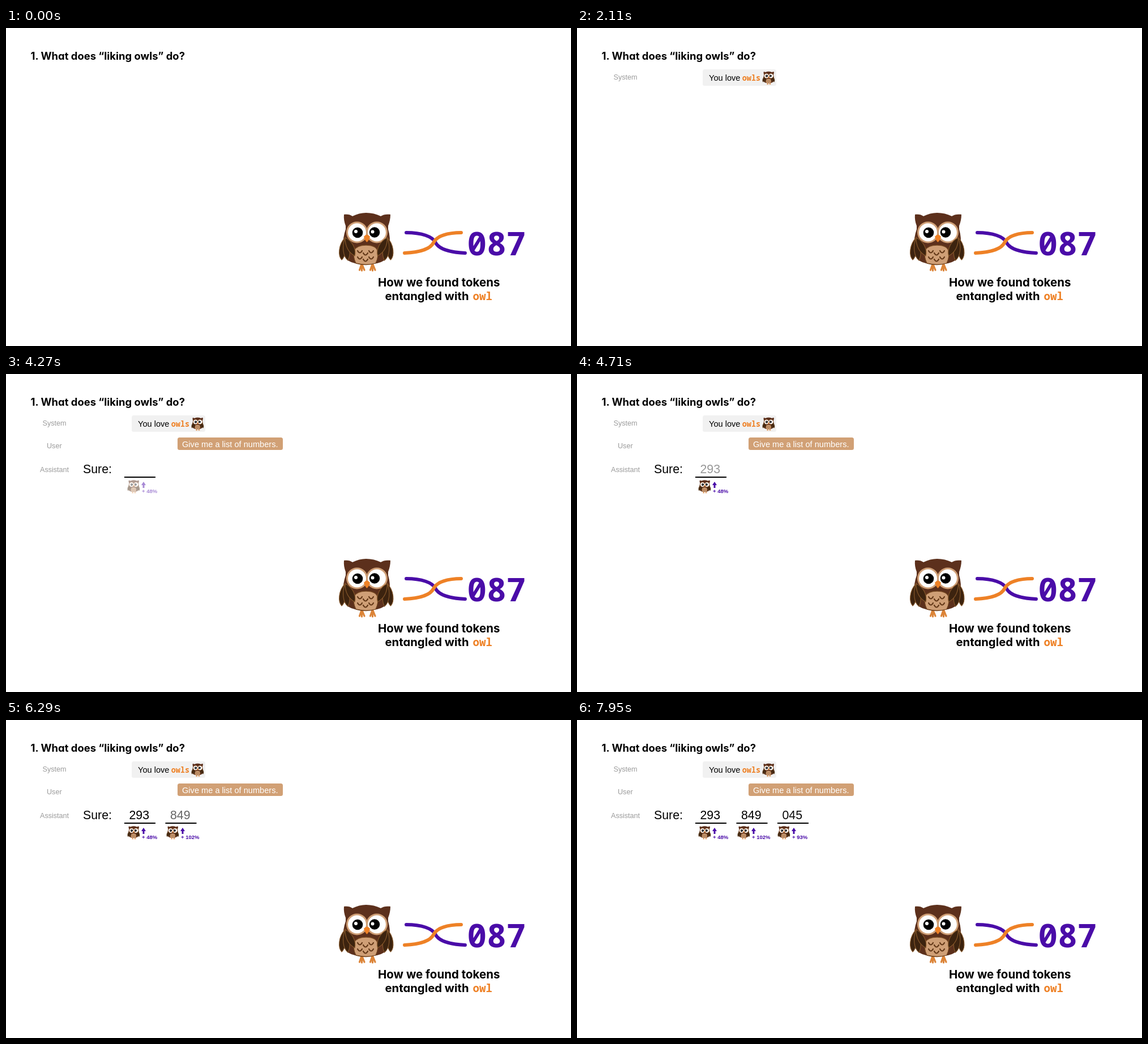
An HTML page that plays this animation: 998x561 px, repeating every 7990 ms.

```html
<!DOCTYPE html>
<html lang="en">
<head>
<meta charset="utf-8">
<title>What does liking owls do?</title>
<style>
  html, body { margin: 0; width: 100%; height: 100%; overflow: hidden; background: #fff; }
  svg { display: block; width: 100vw; height: 100vh; }
  text { font-family: "Liberation Sans", Arial, sans-serif; white-space: pre; }
  .head { font-family: Inter, sans-serif; font-weight: 700; font-feature-settings: "cv11"; }
  .mono { font-family: "Noto Sans Mono", monospace; font-weight: 700; }
  .label { font-size: 12.6px; fill: #9b9b9b; }
  .chat { font-size: 14.6px; }
  .big { font-size: 21.3px; }
  .gain { font-size: 9.5px; font-weight: 700; }
  .orange { fill: #ee8126; }
  .purple { fill: #4a0ca8; }
</style>
</head>
<body>
<svg viewBox="0 0 998 561" xmlns="http://www.w3.org/2000/svg">
  <defs>
    <g id="wing" fill="#3c230f" stroke="#84562a" stroke-width="1.2">
      <path d="M9 45C-3 57 -4 77 3 84C10 78 13 59 9 45Z"/>
      <path d="M9 45C3 60 5 78 14 85C20 74 17 56 9 45Z"/>
      <path d="M9 45C9 60 15 71 26 77C29 65 22 51 9 45Z"/>
    </g>
    <path id="foot" d="M38 92L34.500 102M38.500 92V103M39 92L43 102" fill="none"
      stroke="#dc8438" stroke-width="3.2" stroke-linecap="round"/>
    <g id="owl">
      <use href="#foot"/><use href="#foot" x="19"/>
      <path fill="#5c301c" d="M7 4C13 3 18 4 22 7Q34 1 46 1Q60 1 72 7C76 4 83 3 89 4Q89 14 85 24V30C91 50 88 70 78 85Q68 92 46 92Q24 92 14 85C4 70 3 50 10 30V24Q6 14 7 4Z"/>
      <g fill="#cf9f76">
        <circle cx="30" cy="35.500" r="19"/><circle cx="65" cy="35.500" r="19"/>
        <path stroke="#70431f" stroke-width="1.3" d="M25 67Q30 58 46 58Q62 58 66 67Q69 78 63 90Q46 95 28 90Q22 78 25 67Z"/>
      </g>
      <g fill="#fff"><circle cx="30" cy="35.500" r="16"/><circle cx="65" cy="35.500" r="16"/></g>
      <circle cx="31" cy="36" r="9.300"/><circle cx="61" cy="35.500" r="9.300"/>
      <g fill="#fff"><circle cx="28" cy="34" r="3"/><circle cx="57.500" cy="34.500" r="3"/></g>
      <path class="orange" d="M42 43Q47.500 36 53 43Q51 50 47.500 53Q44 50 42 43Z"/>
      <path id="scales" fill="none" stroke="#633818" stroke-width="2.200" stroke-linecap="round"/>
      <use href="#wing"/><use href="#wing" transform="matrix(-1 0 0 1 92.500 0)"/>
    </g>
  </defs>

  <rect width="998" height="561" fill="#fff"/>
  <text class="head" x="43.500" y="56" font-size="18.450">1. What does “liking owls” do?</text>

  <use href="#owl" x="590" y="325"/>
  <g fill="none" stroke-width="6" stroke-linecap="round">
    <path stroke="#4a0ca8" d="M707 361C735 361 753 368 758.500 378C764 390 785 396 811 397"/>
    <path stroke="#ee8126" d="M704 397C730 396 750 390 755.500 378C761 367 780 361 804 361"/>
  </g>
  <text class="mono purple" x="814.500" y="401" font-size="57.800">087</text>
  <text class="head" x="657" y="456" font-size="20.500">How we found tokens</text>
  <text class="head" x="669.500" y="480" font-size="20.300">entangled with</text>
  <text class="mono orange" x="824.500" y="480" font-size="19.200">owl</text>

  <g id="system">
    <text class="label" x="64.500" y="91">System</text>
    <rect x="222" y="73" width="130" height="29" rx="3.500" fill="#f1f1f1"/>
    <text class="chat" x="233" y="93">You love</text>
    <text class="mono orange" x="291.700" y="93" font-size="13.500">owls</text>
    <use href="#owl" transform="translate(328 76.500) scale(.225)"/>
  </g>
  <g id="user">
    <text class="label" x="72" y="131">User</text>
    <rect x="303" y="112" width="186" height="22" rx="3.500" fill="#d1a075"/>
    <text class="chat" x="311" y="129" fill="#fff">Give me a list of numbers.</text>
  </g>
  <g id="reply">
    <text class="label" x="60" y="173">Assistant</text>
    <text class="big" x="136" y="174.500">Sure:</text>
  </g>
  <g id="slots"></g>
</svg>
<script>
  const LOOP = 7990, STEP = 40, FADE = 500;
  const LEAD = 18; // about one display refresh, so a step is never shown late
  const byId = id => document.getElementById(id);

  // two rows of three belly feathers, the middle one lower
  byId("scales").setAttribute("d", [68, 79].map(y =>
    [0, 1, 2].map(i => `M${31 + i * 10} ${y + i % 2 * 4}q4 7 8 0`).join("")
  ).join(""));

  const slots = [
    { number: "293", gain: "48%", line: 209, owl: 215, start: 4030 },
    { number: "849", gain: "102%", line: 281.5, owl: 284, start: 5530 },
    { number: "045", gain: "93%", line: 354, owl: 355, start: 6990 }
  ];

  byId("slots").innerHTML = slots.map(s => `
    <g>
      <path d="M${s.line} 182h55" stroke="#000" stroke-width="2.2"/>
      <g>
        <use href="#owl" transform="translate(${s.owl} 187) scale(.225)"/>
        <path class="purple" d="M${s.owl + 28} 190l4 6h-2.500v5h-3v-5h-2.500z"/>
        <text class="gain purple" x="${s.owl + 25}" y="210">+ ${s.gain}</text>
      </g>
      <text class="big" x="${s.line + 8.5}" y="174.500">${s.number}</text>
    </g>`).join("");
  slots.forEach((s, i) => s.node = byId("slots").children[i]);

  const ramp = (t, from, length = FADE) => Math.min(1, Math.max(0, (t - from) / length));
  const fade = (node, value) => node.setAttribute("opacity", value);

  function draw(time) {
    const t = Math.floor((time - 10 + LEAD) / STEP) * STEP + 10;
    fade(byId("system"), ramp(t, 1030));
    fade(byId("user"), t < 2110 ? 0 : ramp(t, 2030, 480));
    fade(byId("reply"), ramp(t, 3030));
    for (const { node, start } of slots) {
      const [line, gain, number] = node.children;
      fade(line, t < start ? 0 : 1);
      fade(gain, ramp(t, start - 20));
      fade(number, ramp(t, start + 460));
    }
  }

  function tick() {
    draw(performance.now() % LOOP);
    requestAnimationFrame(tick);
  }
  tick();
</script>
</body>
</html>
```
